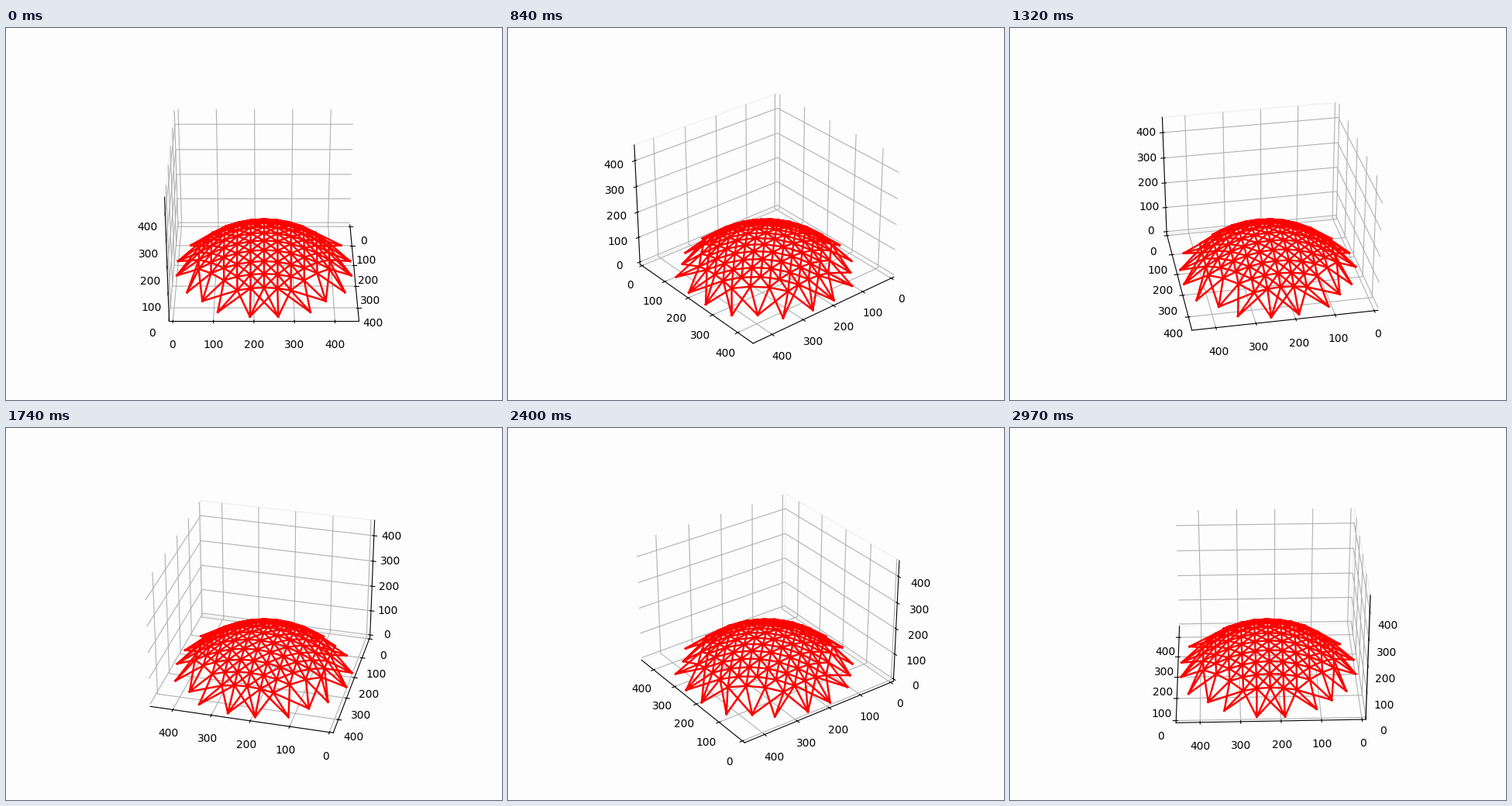
These frames come from a looping animation (640 px wide and 480 px high, 3 s). A matplotlib script:

```python
import matplotlib.pyplot as plt
from matplotlib.animation import FuncAnimation
from itertools import combinations, product
import numpy as np

FRAMES, LOOP_MS = 100, 3000
PAPER = "#fdfdfd"
MID, RISE, RADIUS = 225, 143, 226
REACH = 110  # longest bar from a support to the shell


def roof_node(i, j):
    """Point of the shell for a lattice index, drawn in slightly near the rim."""
    step = 34.5 - 0.04 * (i * i + j * j)
    x, y = i * step, j * step
    return MID + x, MID + y, RISE * (1 - (x * x + y * y) / RADIUS**2)


def build_feet():
    """Supports on the ground, mirrored about both axes and the diagonal."""
    feet = [(x, y, 0) for x in (0, 450) for y in (190, 260)]
    feet += [(x, y, 0) for x in (30, 430) for y in (110, 340)]
    feet += [(y, x, 0) for x, y, _ in feet]
    return feet + [(x, y, 0) for x in (70, 380) for y in (70, 380)]


def build_bars():
    cells = [c for c in product(range(-5, 6), repeat=2)
             if c[0] ** 2 + c[1] ** 2 < 30]
    bars = [(roof_node(*a), roof_node(*b)) for a, b in combinations(cells, 2)
            if max(abs(a[0] - b[0]), abs(a[1] - b[1])) == 1]
    bars += [(f, n) for f in build_feet() for n in (roof_node(*c) for c in cells)
             if np.hypot.reduce(np.subtract(f, n)) < REACH]
    return bars


fig = plt.figure(figsize=(6.4, 4.8), dpi=100, facecolor=PAPER)
ax = fig.add_subplot(projection="3d", facecolor=PAPER)

# one line for all bars, broken by NaN rows
gap = (np.nan,) * 3
path = [p for a, b in build_bars() for p in (a, b, gap)]
ax.plot(*np.array(path).T, color="red", lw=1.75)

pad = 450 / 48
lim = (-pad, 450 + pad)
ax.set(xlim=lim, ylim=lim, zlim=lim)
for axis in (ax.xaxis, ax.yaxis, ax.zaxis):
    axis.set_ticks(range(0, 401, 100))
    axis.pane.fill = False
ax.xaxis.pane.set_edgecolor("none")


def turn(n):
    # the tiny offset keeps the side wall on the left at the start
    ax.view_init(elev=30, azim=180 * n / FRAMES + 1e-6)
    return []


anim = FuncAnimation(fig, turn, frames=FRAMES, init_func=lambda: turn(0),
                     interval=LOOP_MS / FRAMES, repeat=True, repeat_delay=0)
plt.show()
```
